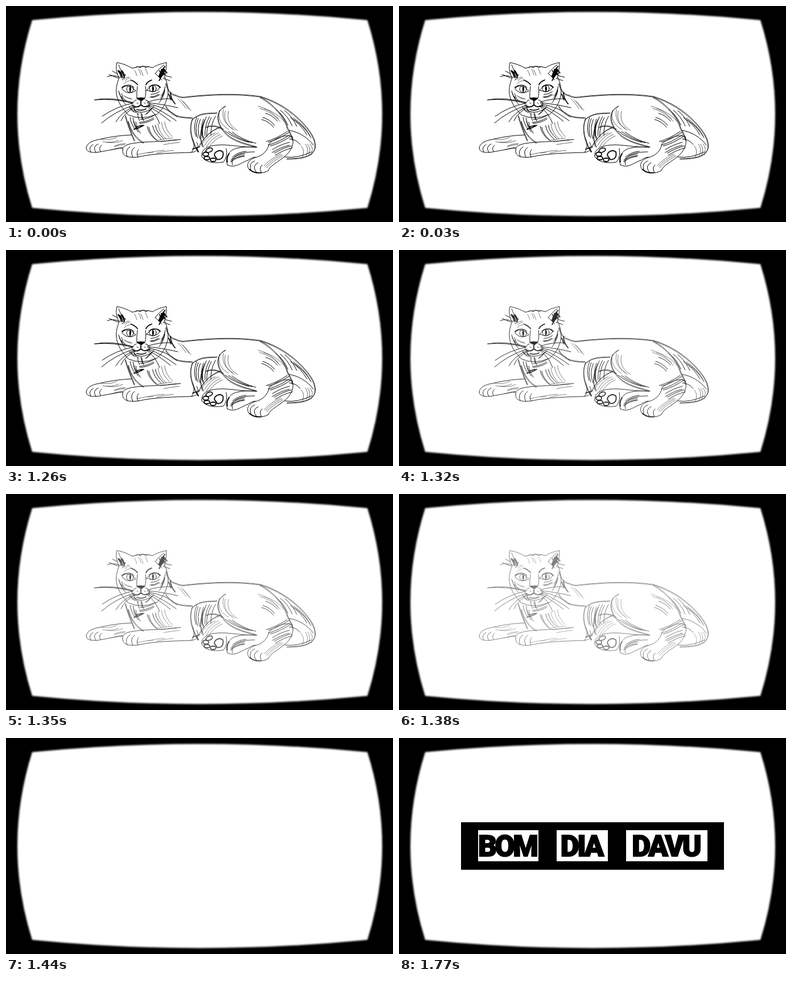
Animation of 680x382 px, one loop 3900 ms. Source, as an HTML page:

```html
<!DOCTYPE html>
<html lang="pt">
<head>
<meta charset="utf-8">
<title>Bom dia</title>
<style>
  html, body { margin: 0; width: 100%; height: 100%; overflow: hidden; background: #000; }
  svg { display: block; width: 100%; height: 100%; }
  #cat { fill: none; stroke: #000; stroke-width: 1; stroke-linecap: round; stroke-linejoin: round; }
  #cat .solid { fill: #000; }
  #cat .bold { stroke-width: 1.8; }
  #cat .fine { stroke-width: .6; }
  #title text {
    font: 900 51px Roboto, sans-serif; letter-spacing: -3.5px; text-anchor: middle;
    stroke: #000; stroke-width: 2;
  }
</style>
</head>
<body>
<svg viewBox="0 0 680 382">
  <filter id="soft"><feGaussianBlur stdDeviation="1.7"/></filter>
  <rect width="680" height="382"/>
  <path fill="#fff" filter="url(#soft)" d="M46 25Q340-4 635 25Q687 191 635 357Q340 386 46 357Q-6 191 46 25Z"/>

  <g id="cat">
    <!-- head -->
    <path d="M222 110C213 105 206 102 195 100C193 108 193 116 199 128M222 110Q240 104 258 109C265 104 273 102 282 100C281 110 282 117 278 127
      M198 129C193 142 192 155 197 166C200 176 207 183 215 193M279 126C285 139 287 155 282 166C279 177 272 186 263 193
      M216 193Q238 203 263 192M224 184Q237 192 252 184"/>
    <path d="M198 104C201 112 203 118 210 122M278 104C272 108 267 113 262 120M178 125Q187 121 200 126M181 121L198 128M187 115L196 120
      M279 123L291 126M276 128L288 132M227 109L231 107L236 109L240 106L246 109L250 107M210 122L204 131M262 119L274 131"/>
    <!-- eyes, nose and mouth -->
    <path d="M204 145Q214 135 228 150Q216 158 206 149ZM247 149Q258 134 271 143Q265 156 247 149ZM208 142Q216 136 225 144M251 143Q260 136 269 141"/>
    <circle cx="218" cy="147" r="6"/><circle cx="258" cy="146" r="6"/>
    <path class="solid" d="M218 142Q221 147 218 152Q216 147 218 142ZM258 141Q261 146 258 151Q256 146 258 141ZM230 163Q237 161 244 163L238 168Z"/>
    <path class="bold" d="M219 131Q226 133 231 139M246 139Q249 133 256 131M231 164Q237 167 243 164M237 169V175M237 175Q230 181 224 177M237 175Q244 181 251 176
      M204 144L209 141M267 141L271 144M230 183Q238 186 246 182"/>
    <path d="M231 142Q229 154 230 163M245 142Q247 155 244 163M229 166Q219 170 222 178M245 166Q256 169 252 178M230 171L232 173M243 171L245 173"/>
    <!-- whiskers -->
    <path d="M155 166Q184 160 224 171M157 166Q190 163 222 172M168 207Q190 187 225 175M169 195Q193 178 222 172M193 205Q203 187 227 177M202 203Q209 187 229 178
      M249 171Q278 174 302 180M249 173Q285 180 301 196M250 175Q275 185 299 203M247 176Q269 187 289 204M248 178Q263 189 270 208M248 170Q269 163 290 164"/>
    <!-- body -->
    <path id="outline" d="M281 137C285 149 289 156 299 158C308 163 315 161 324 160C364 156 405 154 447 160C477 169 502 186 520 205C535 221 546 237 543 252C539 266 521 270 494 270
      M210 194C214 209 219 222 226 238M215 204C220 223 230 235 242 242M281 177C294 200 315 196 328 198M328 200C321 216 326 238 338 257
      M327 201C341 188 356 190 371 189M386 177C367 186 371 206 382 220C395 238 419 243 440 249M447 161C471 174 490 197 495 216Q501 225 504 237
      M350 201C342 216 339 235 347 249M352 214Q367 208 382 218M340 247C350 230 360 220 377 214"/>
    <use href="#outline" class="fine" x="-.8" y="1.2"/>
    <!-- forelegs -->
    <path d="M221 228C198 229 180 232 164 236C150 238 141 244 141 252C143 259 150 259 159 259C172 257 190 253 205 251
      M149 258Q144 250 153 245M158 259Q151 249 162 244M166 257Q162 251 168 246
      M205 255C204 248 212 245 222 243C246 239 272 241 307 236M205 255C204 266 215 269 232 267C263 260 298 260 325 259C336 258 341 252 335 241
      M213 267Q208 255 218 249M223 268Q217 256 226 250M232 267Q228 259 233 254M326 259Q334 249 328 235"/>
    <!-- hind legs and tail -->
    <path d="M344 266C342 253 356 247 371 246C392 244 417 251 437 249M344 266C349 276 365 279 382 276Q390 267 387 252
      M389 281C384 267 393 253 408 251C421 248 432 250 441 250M389 281C403 288 412 277 425 273Q431 268 438 267M398 281C394 267 407 258 437 258
      M503 231C490 226 472 234 462 244C460 256 451 265 438 268C425 272 421 282 428 290C437 297 451 297 461 291C464 282 478 276 491 265C502 255 507 243 503 231
      M430 289Q426 278 437 274M440 294Q431 283 443 277M449 295Q444 286 450 281
      M497 220C513 222 530 232 540 246M498 235Q510 236 517 245M490 267Q512 270 537 258"/>
    <g class="bold">
      <ellipse cx="357" cy="255" rx="6" ry="3.5" transform="rotate(-22 357 255)"/>
      <ellipse cx="351" cy="262" rx="5" ry="3.5"/>
      <ellipse cx="353" cy="269" rx="5" ry="3"/>
      <ellipse cx="364" cy="272" rx="5" ry="3"/>
      <path d="M368 259Q375 253 381 258Q383 266 378 270Q371 274 369 268Q364 264 368 259Z"/>
      <path d="M289 153Q289 163 297 173M286 156L290 166M225 218Q234 216 242 211M228 214L239 211M328 253L340 249M334 251L338 258M389 276Q387 268 392 261M428 289Q436 296 447 295"/>
    </g>
  </g>

  <g id="title" visibility="hidden"><rect x="109" y="149" width="462" height="84"/></g>
</svg>
<script>
const NS = 'http://www.w3.org/2000/svg';
const cat = document.getElementById('cat');
const title = document.getElementById('title');

function add(parent, tag, attributes, text = '') {
  const node = document.createElementNS(NS, tag);
  for (const name in attributes) node.setAttribute(name, attributes[name]);
  node.textContent = text;
  parent.append(node);
}

// Repeats one pen stroke, with slightly uneven spacing.
function hatch(x, y, curve, count, dx, dy, style = '') {
  let d = '';
  for (let i = 0; i < count; i++) {
    const wobble = Math.sin(i * 2.4 + x) * 1.2;
    d += `M${x + i * dx + wobble} ${y + i * dy - wobble}q${curve}`;
  }
  add(cat, 'path', { d, class: style });
}

// ears and face
hatch(196, 115, '4 4 5 11', 5, 2, 0, 'bold');
hatch(278, 108, '-5 5 -9 13', 5, .3, 2.4, 'bold');
hatch(270, 114, '2 5 6 8', 4, 2, -1, 'bold');
hatch(226, 113, '3 5 4 10', 4, 6, -.5, 'fine');
hatch(207, 130, '5 -5 9 -5', 3, 1, 3, 'fine');
hatch(198, 150, '2 9 7 14', 4, 2, 3);
hatch(280, 142, '-1 10 -7 16', 4, -1, 4);
hatch(254, 157, '8 0 15 -5', 3, 0, 3);
hatch(207, 158, '6 5 13 5', 3, 1, 3, 'fine');
hatch(217, 178, '2 6 8 9', 4, 3, 1);
hatch(259, 178, '-4 7 -9 9', 4, -2, 2);
// chest and shoulder
hatch(219, 196, '1 10 8 20', 4, 3, 3);
hatch(232, 190, '0 6 3 12', 3, 4, 0);
hatch(247, 214, '2 13 15 24', 4, 5, -1);
hatch(268, 207, '1 15 14 27', 3, 5, -1, 'fine');
hatch(234, 209, '14 -1 25 -8', 3, 1, -4);
hatch(302, 165, '8 8 14 17', 3, 5, 1, 'fine');
hatch(264, 238, '15 -3 28 -4', 3, 7, 3, 'fine');
hatch(231, 262, '15 -4 29 -5', 3, 17, -1, 'fine');
hatch(166, 236, '15 3 28 -3', 3, 5, 3, 'fine');
hatch(187, 253, '10 -4 19 -4', 3, 2, -3, 'fine');
// flank, thigh and tail
hatch(334, 198, '-7 17 -1 34', 5, 4, 1);
hatch(352, 196, '-9 16 -8 34', 4, 5, 0);
hatch(344, 246, '9 -17 25 -23', 4, 4, 2, 'fine');
hatch(376, 183, '-5 22 16 34', 4, 5, 1, 'fine');
hatch(384, 222, '18 14 42 20', 3, 7, 0);
hatch(442, 178, '22 6 36 23', 3, 5, 2, 'fine');
hatch(449, 201, '12 3 21 14', 3, 3, -5);
hatch(475, 182, '14 11 21 28', 3, 7, 2);
hatch(501, 196, '19 12 29 31', 3, 3, 3);
hatch(458, 239, '18 -5 37 -18', 4, 2, 3);
hatch(467, 255, '14 -9 30 -13', 4, 2, 3);
hatch(453, 283, '12 -13 29 -21', 3, 3, 1, 'fine');
hatch(520, 246, '7 8 2 20', 4, 5, -1, 'fine');
hatch(397, 268, '10 -9 24 -10', 4, -1, 3);

for (const [word, x, width] of [['BOM', 139, 106], ['DIA', 277, 90], ['DAVU', 399, 143]]) {
  add(title, 'rect', { x, y: 163, width, height: 55, fill: '#fff' });
  add(title, 'text', { x: x + width / 2 - 1.75, y: 209 }, word);
}

function draw(now) {
  const time = now % 3900;
  const step = Math.floor((time - 1230) / 30);
  const fade = Math.min(1, Math.max(0, step / 7));
  cat.setAttribute('opacity', 1 - fade * fade);
  title.setAttribute('visibility', time >= 1770 ? 'visible' : 'hidden');
  requestAnimationFrame(draw);
}
draw(0);
</script>
</body>
</html>
```
